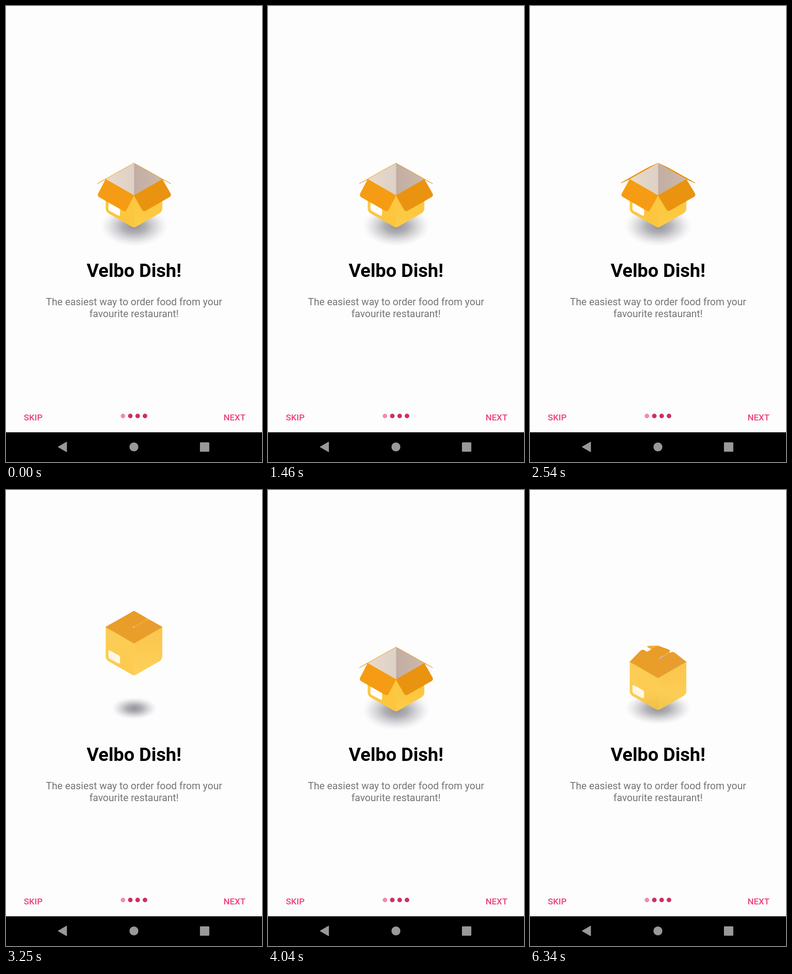
An HTML page that plays this animation: 561x998 px, repeating every 6390 ms.

```html
<!DOCTYPE html>
<html lang="en">
<head>
<meta charset="utf-8">
<title>Onboarding</title>
<style>
  html, body { margin: 0; width: 100%; height: 100%; overflow: hidden; background: #fdfdfd; }
  svg { display: block; width: 561px; height: 998px; }
  text { font-family: Roboto, sans-serif; }
  .title { font-size: 40.9px; font-weight: 700; }
  .body { font-size: 21.82px; fill: #757575; }
  .action { font-size: 19.09px; font-weight: 500; fill: #ec407a; }
  .mid { text-anchor: middle; }
  .end { text-anchor: end; }
</style>
</head>
<body>
<svg viewBox="0 0 561 998">
  <defs>
    <radialGradient id="shade">
      <stop offset="0" stop-color="#85858c" stop-opacity=".9"/>
      <stop offset=".35" stop-color="#93939a" stop-opacity=".72"/>
      <stop offset=".7" stop-color="#b0b0b8" stop-opacity=".36"/>
      <stop offset="1" stop-color="#d0d0d8" stop-opacity="0"/>
    </radialGradient>
    <linearGradient id="wallL"><stop stop-color="#eadbc8"/><stop offset="1" stop-color="#ddd0c6"/></linearGradient>
    <linearGradient id="wallR"><stop stop-color="#c2ada2"/><stop offset="1" stop-color="#cdb9ab"/></linearGradient>
    <linearGradient id="sideL" x2="0" y2="1"><stop stop-color="#fbc845"/><stop offset="1" stop-color="#fdc53c"/></linearGradient>
    <linearGradient id="sideR" x2="0" y2="1"><stop stop-color="#fbc03a"/><stop offset="1" stop-color="#fdcc46"/></linearGradient>
  </defs>

  <ellipse id="shadow" cx="281" fill="url(#shade)"/>
  <g id="box">
    <g id="behind"></g>
    <path d="M280.5 344 218.5 379 280.5 414.500Z" fill="url(#wallL)"/>
    <path d="M280.500 344 342.500 379 280.500 414.500Z" fill="url(#wallR)"/>
    <g id="inside"></g>
    <path d="M218.500 379 280.800 414.500V484.500Q278.500 484.500 275 482.500L225 454Q218.500 450 218.500 443Z" fill="url(#sideL)"/>
    <path d="M342.500 379 280.500 414.500V484.500Q282.500 484.500 286 482.500L336 454Q342.500 450 342.500 443Z" fill="url(#sideR)"/>
    <path id="label" d="M224.500 433Q224.500 428.500 229 431L246.500 440.500Q250 442.500 250 446V455.500Q250 460 246 458.500L228 449Q224.500 447 224.500 443Z" fill="#fff"/>
    <g id="front"></g>
  </g>

  <text class="title mid" x="280.5" y="593">Velbo Dish!</text>
  <text class="body mid" x="280.5" y="655">The easiest way to order food from your</text>
  <text class="body mid" x="280.5" y="680.7">favourite restaurant!</text>
  <text class="action" x="39" y="907">SKIP</text>
  <text class="action end" x="524.800" y="907">NEXT</text>

  <g fill="#ce2f62">
    <circle cx="256.300" cy="897.300" r="5" fill="#f48bab"/>
    <circle cx="272.400" cy="897.300" r="5"/>
    <circle cx="288.500" cy="897.300" r="5"/>
    <circle cx="304.600" cy="897.300" r="5"/>
  </g>

  <path d="M0 933H561V998H0Z"/>
  <g fill="#999">
    <path d="M114 965 133 954V976Z" stroke="#999" stroke-linejoin="round"/>
    <circle cx="280.300" cy="965" r="9.800"/>
    <rect x="425" y="955" width="20.500" height="20.500" rx="1.500"/>
  </g>
</svg>
<script>
const LOOP = 6390, WAKE = 840, START = 290, CYCLE = 1460;
const $ = id => document.getElementById(id);
const mix = (a, b, u) => a + (b - a) * u;
const clamp = u => Math.max(0, Math.min(1, u));

const LEFT = [218.5, 379], RIGHT = [342.5, 379], BACK = [280.5, 344], FRONT = [280.5, 414.5];
const STEPS = [160, 290, 460, 630, 800];

// out: direction on screen that points away from the hinge; angles in degrees, 180 is shut
const flaps = [
  { hinge: [BACK, RIGHT], out: [62, -35], size: .47, angles: [180, 115, 75, 28, -44],
    up: [246, 163, 32], down: [236, 148, 20] },
  { hinge: [LEFT, BACK], out: [-62, -35], size: .47, angles: [180, 154, 77, 28, -44],
    up: [231, 146, 18], down: [236, 148, 20] },
  { hinge: [RIGHT, FRONT], out: [62, 35], size: .48, angles: [180, 152, 57, 15, -46],
    up: [229, 148, 24], down: [234, 147, 16] },
  { hinge: [LEFT, FRONT], out: [-62, 35], size: .475, angles: [180, 124, 54, 10, -50],
    up: [233, 148, 20], down: [245, 156, 20] }
];

for (const f of flaps) {
  f.el = document.createElementNS("http://www.w3.org/2000/svg", "path");
  f.el.setAttribute("stroke-linejoin", "round");
  f.rear = f.out[1] < 0;
  $(f.rear ? "behind" : "front").append(f.el);
}

function track(values, t) {
  if (t <= STEPS[0]) return values[0];
  const i = STEPS.findIndex(s => t < s);
  if (i < 0) return values[values.length - 1];
  let u = (t - STEPS[i - 1]) / (STEPS[i] - STEPS[i - 1]);
  if (i === STEPS.length - 1) u = u * (1.3 - .3 * u);
  return mix(values[i - 1], values[i], u);
}

function toward(p, q, d) {
  const len = Math.hypot(q[0] - p[0], q[1] - p[1]) || 1;
  const u = Math.min(d / len, .45);
  return [mix(p[0], q[0], u), mix(p[1], q[1], u)];
}

function drawFlap(f, t) {
  const deg = track(f.angles, t), a = deg * Math.PI / 180;
  const c = f.size * Math.cos(a), s = f.size * Math.sin(a);
  const [p, q] = f.hinge;
  const tip = h => [h[0] + f.out[0] * c, h[1] + f.out[1] * c - 71 * s];
  const P = tip(p), Q = tip(q);
  const r = 6;
  f.el.setAttribute("d",
    `M${p}L${toward(P, p, r)}Q${P} ${toward(P, Q, r)}L${toward(Q, P, r)}Q${Q} ${toward(Q, q, r)}L${q}Z`);
  const u = clamp((50 - deg) / 90);
  const color = `rgb(${f.up.map((v, i) => Math.round(mix(v, f.down[i], u)))})`;
  f.el.setAttribute("fill", color);
  f.el.setAttribute("stroke", color);
  f.el.setAttribute("stroke-width", f.rear ? 1 : .5);
  if (f.rear) {
    const layer = $(deg > 90 ? "inside" : "behind");
    if (f.el.parentNode !== layer) layer.append(f.el);
  }
}

function draw(time) {
  // the box rests open until the first run wakes up midway
  const t = time < WAKE ? CYCLE : (time - START) % CYCLE;
  const fall = clamp(t / 220);
  const y = t < 220 ? mix(-82, 4, fall * fall) : 4 * (1 - clamp((t - 220) / 480));
  const solid = clamp((t - 290) / 170);
  $("box").setAttribute("transform", `translate(0 ${y.toFixed(2)})`);
  $("box").setAttribute("opacity", mix(.9, 1, solid));
  $("label").setAttribute("fill-opacity", mix(.85, 1, solid));

  const spread = clamp((t - 220) / 500);
  const near = mix(.6, 1, fall);
  $("shadow").setAttribute("cx", 281);
  $("shadow").setAttribute("cy", mix(478, 482, spread));
  $("shadow").setAttribute("rx", 74 * near);
  $("shadow").setAttribute("ry", mix(36, 44, spread) * near);
  flaps.forEach(f => drawFlap(f, t));
}

const origin = performance.now();
function tick() {
  draw((performance.now() - origin) % LOOP);
  requestAnimationFrame(tick);
}
tick();
</script>
</body>
</html>
```
